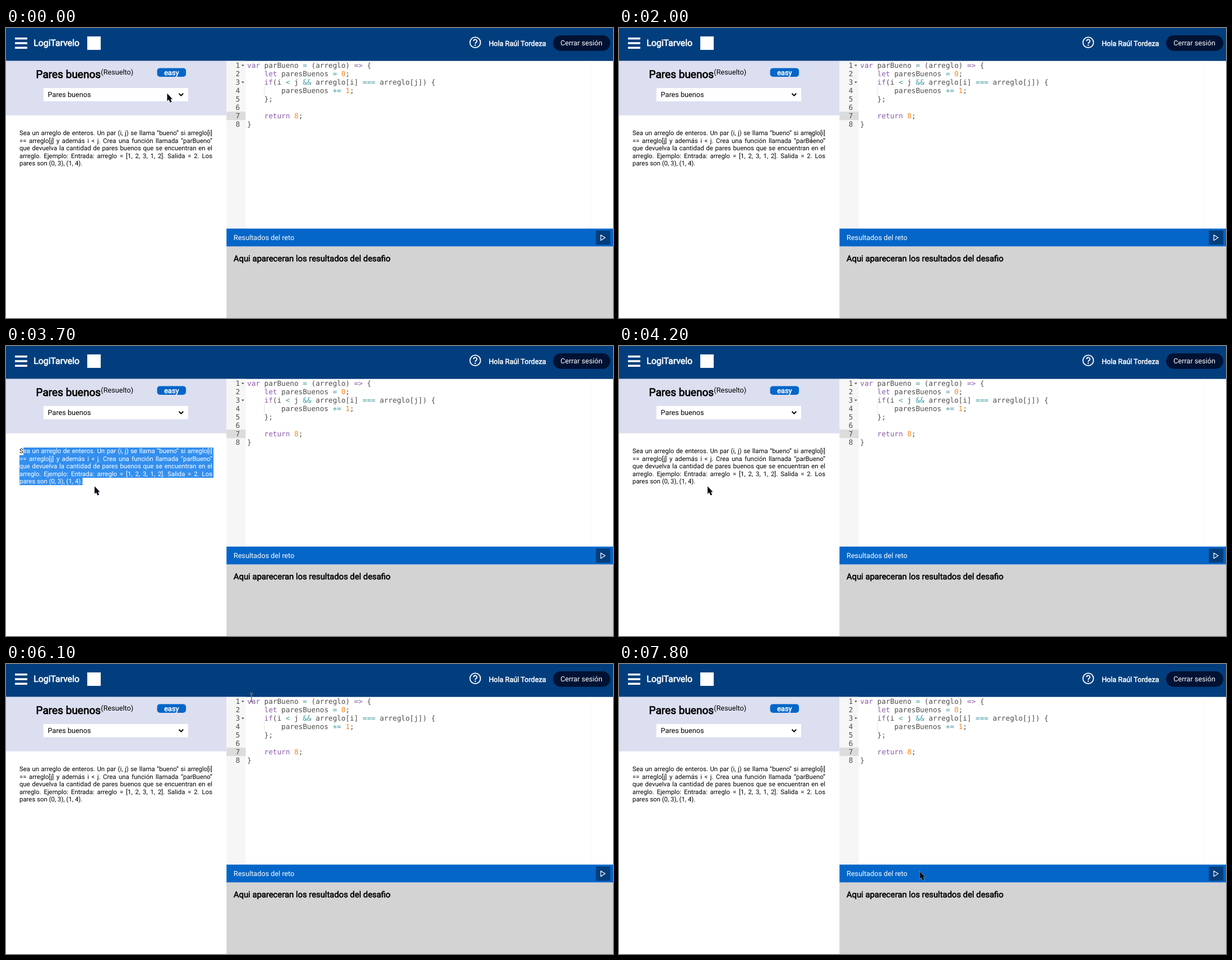
These frames come from a looping animation (1083x517 px, 8 s). An HTML page:

```html
<!DOCTYPE html>
<html lang="es">
<head>
<meta charset="utf-8">
<title>Reto de programación</title>
<style>
html, body { margin: 0; width: 100%; height: 100%; overflow: hidden; background: #fff; }
svg { position: absolute; left: 0; top: 0; width: 1083px; height: 517px; }
text { font: 12.685px Roboto, sans-serif; white-space: pre; text-rendering: geometricPrecision; }
.bold { stroke: currentColor; stroke-width: .04em; }
.light { fill: #fff; color: #fff; }
.code text { font: 12.685px "DejaVu Sans Mono", monospace; fill: #4d4d4c; }
.k { fill: #8959a8; }
.o { fill: #3e999f; }
.n { fill: #f5871f; }
/* The paragraph is laid out at full size and shown reduced. */
.task {
  position: absolute; left: 23.8px; top: 181.4px; width: 434px; padding-right: 4px;
  transform: scale(.7928); transform-origin: 0 0;
  font: 14.4px/17px Roboto, sans-serif; text-rendering: geometricPrecision; color: #000;
}
.task div { height: 17px; white-space: nowrap; text-align: justify; text-align-last: justify; }
.task div:last-child { text-align-last: left; }
#selection { background: #338fee; color: #fff; visibility: hidden; }
</style>
</head>
<body>
<svg viewBox="0 0 1083 517">
  <rect width="1083" height="58.7" fill="#023e7d"/>
  <path d="M16 18.8H38M16 27H38M16 35.2H38" stroke="#fff" stroke-width="3.4"/>
  <text x="49.2" y="32.4" class="light bold" style="font-size:15.86px">LogiTarvelo</text>
  <rect x="145" y="15" width="24" height="24" fill="#fff"/>
  <circle cx="837.2" cy="25.8" r="9.4" fill="none" stroke="#fff" stroke-width="1.8"/>
  <path d="M834.3 23.4a2.9 2.9 0 1 1 4.3 2.5q-1.4 .8-1.4 2.4" fill="none" stroke="#fff" stroke-width="1.8"/>
  <circle cx="837.2" cy="30.8" r="1.2" fill="#fff"/>
  <text x="861.2" y="31.6" class="light bold">Hola Raúl Tordeza</text>
  <rect x="976" y="12.9" width="102.2" height="27.8" rx="13.9" fill="#001233"/>
  <text x="989.3" y="31.2" class="light">Cerrar sesión</text>

  <rect y="58.7" width="393.4" height="97" fill="#dcdff0"/>
  <text x="53.6" y="89" class="bold" style="font-size:19.03px">Pares buenos</text>
  <text x="169.3" y="83.4">(Resuelto)</text>
  <rect x="269.6" y="71.4" width="51.5" height="15.5" rx="5" fill="#0466c8"/>
  <text x="282.3" y="83.5" class="light bold">easy</text>
  <rect x="66.8" y="107" width="258.2" height="23.6" fill="#fff"/>
  <text x="74.6" y="123.3">Pares buenos</text>
  <path d="M308.6 116.8l3.8 3.8 3.8-3.8" fill="none" stroke="#000" stroke-width="2"/>

  <rect x="393.4" y="58.7" width="34.1" height="299" fill="#f6f6f6"/>
  <rect x="393.4" y="149.1" width="34.1" height="15.1" fill="#dcdcdc"/>
  <path d="M1043.5 58.7V358" stroke="#f6f6f6"/>
  <path d="M461 104.3V119.4" stroke="#c4c4c4" stroke-dasharray="1 1"/>
  <path d="M420 65.5h5l-2.5 3zM420 95.6h5l-2.5 3z" fill="#555"/>
  <g class="code" id="code"></g>

  <rect x="393.4" y="357.6" width="689.6" height="32" fill="#0466c8"/>
  <text x="406.1" y="378" class="light">Resultados del reto</text>
  <rect x="1052.5" y="361" width="25.7" height="25.4" fill="#023e7d"/>
  <path d="M1061.2 368.9V378.7L1069 373.8Z" fill="none" stroke="#fff" stroke-width="1.2" stroke-linejoin="round"/>
  <rect x="393.4" y="389.6" width="689.6" height="127.4" fill="#d3d3d3"/>
  <text x="406.1" y="416" class="bold" style="font-size:14.84px">Aqui apareceran los resultados del desafio</text>
</svg>

<div class="task" id="task">
  <div>Sea un arreglo de enteros. Un par (i, j) se llama “bueno” si arreglo[i]</div>
  <div>== arreglo[j] y además i &lt; j. Crea una función llamada “parBueno”</div>
  <div>que devuelva la cantidad de pares buenos que se encuentran en el</div>
  <div>arreglo. Ejemplo: Entrada: arreglo = [1, 2, 3, 1, 2]. Salida = 2. Los</div>
  <div>pares son (0, 3), (1, 4).</div>
</div>
<div class="task" id="selection"></div>

<svg viewBox="0 0 1083 517">
  <path id="arrow" d="M0 0V13.6L3 11.2L5.4 16.2L8.2 15L6 10.2H9.6Z" fill="#0b0d16" stroke="#fff" stroke-width=".7" stroke-linejoin="round" paint-order="stroke"/>
  <g id="beam" fill="none">
    <path d="M-3-7.5H-1L0-6.8L1-7.5H3M0-6.8V6.8M-3 7.5H-1L0 6.8L1 7.5H3" stroke="#fff" stroke-width="2" stroke-opacity=".7"/>
    <path d="M-3-7.5H-1L0-6.8L1-7.5H3M0-6.8V6.8M-3 7.5H-1L0 6.8L1 7.5H3" stroke="#222" stroke-width="1"/>
  </g>
</svg>

<script>
const LOOP = 8000;
const el = id => document.getElementById(id);
const { code, task, selection, arrow, beam } = Object.fromEntries(
  ["code", "task", "selection", "arrow", "beam"].map(id => [id, el(id)]));

// Each token is marked as {class|text}.
const lines = [
  "{k|var} parBueno {o|=} (arreglo) {k|=>} {",
  "    {k|let} paresBuenos {o|=} {n|0};",
  "    {k|if}(i {o|<} j {o|&&} arreglo[i] {o|===} arreglo[j]) {",
  "        paresBuenos {o|+=} {n|1};",
  "    };",
  "",
  "    {k|return} {n|8};",
  "}"
];
const escapeHtml = s => s.replace(/&/g, "&amp;").replace(/</g, "&lt;");
const paint = s => escapeHtml(s).replace(/\{(\w)\|([^}]+)\}/g, '<tspan class="$1">$2</tspan>');
code.innerHTML = lines.map((line, i) => {
  const y = 70.7 + 15.06 * i;
  return `<text x="417.5" y="${y}" text-anchor="end">${i + 1}</text>` +
    `<text x="430.3" y="${y}">${paint(line)}</text>`;
}).join("");

selection.innerHTML = task.innerHTML;

// Pointer steps: time, x, y, shape.
const pointer = [
  [0, 287.5, 116.5, arrow], [700, 282, 105, arrow], [800, 256, 90, arrow],
  [900, 219, 81, arrow], [1000, 262, 98, arrow], [1100, 304, 120, arrow],
  [1200, 326, 139.5, arrow], [1300, 352, 160, arrow], [1400, 371, 178, arrow],
  [1500, 330, 150, arrow], [1600, 286, 126, arrow], [1700, 252, 113, arrow],
  [1800, 290, 132, arrow], [1900, 341, 162, arrow], [2000, 343, 195, beam],
  [2200, 300, 197, beam], [2300, 220, 195, beam], [2400, 127, 186, beam],
  [2500, 133, 187, beam], [3300, 36, 195, beam], [3600, 90, 228, beam],
  [3700, 158, 250, arrow], [4400, 252, 193, beam], [4500, 322, 195, beam],
  [4700, 365, 182.5, beam], [4900, 526, 140, beam], [5100, 519, 158, beam],
  [5300, 518, 180, beam], [5400, 513, 96, beam], [5700, 487.5, 86, beam],
  [5900, 445, 65, beam], [6100, 438, 60, beam], [6300, 479, 95, beam],
  [6500, 514.5, 151, beam], [6900, 632, 252, beam], [7100, 605.5, 263, beam],
  [7400, 480, 374, beam], [7600, 538, 340, beam], [7800, 536.5, 369.5, arrow]
];

// Selected area of the paragraph: full rows, then one row up to "end".
const area = (rows, end) => {
  const top = rows * 17, bottom = top + 17;
  return `polygon(9px 0, 437px 0, 437px ${top}px, ${end}px ${top}px,
    ${end}px ${bottom}px, 0 ${bottom}px, 0 17px, 9px 17px)`;
};
const selected = [[0, ""], [3600, area(3, 83)], [3700, area(4, 142)], [4200, ""]];

const current = (steps, t) => steps.findLast(step => step[0] <= t);

function draw() {
  const t = performance.now() % LOOP;
  const [, x, y, shape] = current(pointer, t);
  for (const s of [arrow, beam]) s.style.visibility = s === shape ? "visible" : "hidden";
  shape.setAttribute("transform", `translate(${x} ${y})`);
  const [, clip] = current(selected, t);
  selection.style.visibility = clip ? "visible" : "hidden";
  selection.style.clipPath = clip || "none";
  requestAnimationFrame(draw);
}
draw();
</script>
</body>
</html>
```
